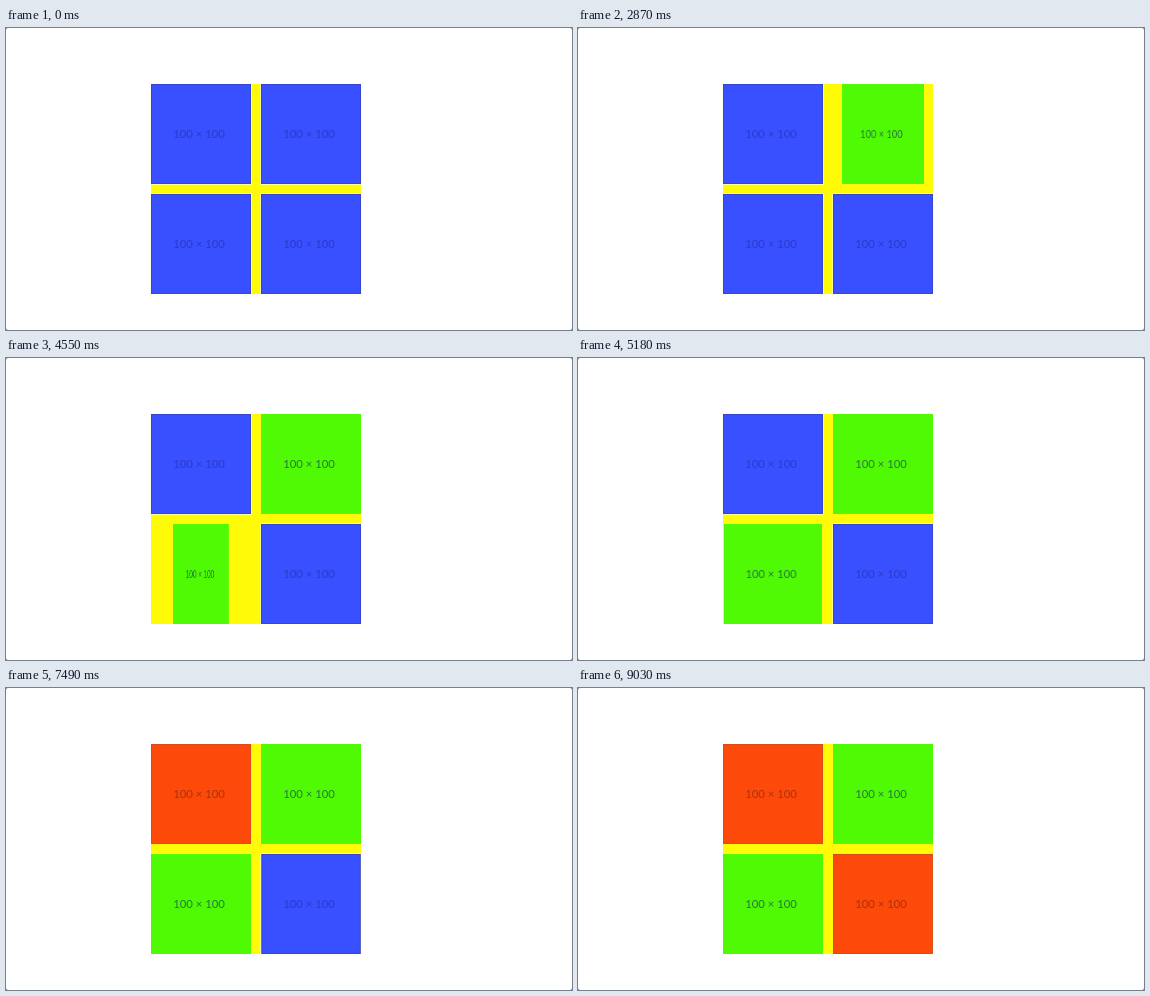
An HTML page that plays this animation: 566x302 px, repeating every 9100 ms.

```html
<!DOCTYPE html>
<html lang="en">
<head>
<meta charset="utf-8">
<title>Flipping tiles</title>
<style>
  html, body { margin: 0; width: 100%; height: 100%; overflow: hidden; background: #666; }
  #stage { position: relative; width: 566px; height: 302px; border-radius: 2px; background: #fff; }
  #board {
    position: absolute; left: 145px; top: 56px; width: 210px; height: 210px;
    background: #fffb08;
  }
  .tile { position: absolute; width: 100px; height: 100px; transform-style: preserve-3d; }
  .face {
    position: absolute; inset: 0; backface-visibility: hidden;
    font: 11.3px/100px Lato, "Open Sans", sans-serif; text-align: center; white-space: pre;
  }
  .face span { position: relative; left: -2px; }
  .back {
    transform: rotateY(180deg); background: #3850ff; color: #2a3cc4;
    box-shadow: inset 0 0 0 1px #3546cf, 0 0 0 1px rgba(255, 255, 225, .6);
  }
  .green { background: #50fa05; color: #237a3c; }
  .red { background: #fd490a; color: #a8340f; box-shadow: inset 0 0 0 1px #dc4a1c; }
</style>
</head>
<body>
<div id="stage"><div id="board"></div></div>
<script>
const LOOP = 9100, FLIP = 2000;
const tiles = [
  { x: 110, y: 0, color: 'green', start: 1860 },
  { x: 0, y: 110, color: 'green', start: 3745 },
  { x: 0, y: 0, color: 'red', start: 5800 },
  { x: 110, y: 110, color: 'red', start: 7400 }
];
const board = document.getElementById('board');

function addFace(tile, kind) {
  const face = document.createElement('div');
  face.className = 'face ' + kind;
  const label = document.createElement('span');
  label.textContent = '100 × 100';
  face.append(label);
  tile.append(face);
}

const flips = tiles.map(({ x, y, color, start }) => {
  const tile = document.createElement('div');
  tile.className = 'tile';
  tile.style.left = x + 'px';
  tile.style.top = y + 'px';
  addFace(tile, 'back');
  addFace(tile, color);
  board.append(tile);
  const flip = tile.animate(
    [{ transform: 'rotateY(180deg)' }, { transform: 'rotateY(0deg)' }],
    { delay: start, duration: FLIP, easing: 'ease', fill: 'both' }
  );
  flip.pause();
  return flip;
});

const origin = performance.now();
function draw() {
  const t = Math.max(0, performance.now() - origin) % LOOP;
  for (const flip of flips) flip.currentTime = t;
  requestAnimationFrame(draw);
}
draw();
</script>
</body>
</html>
```
